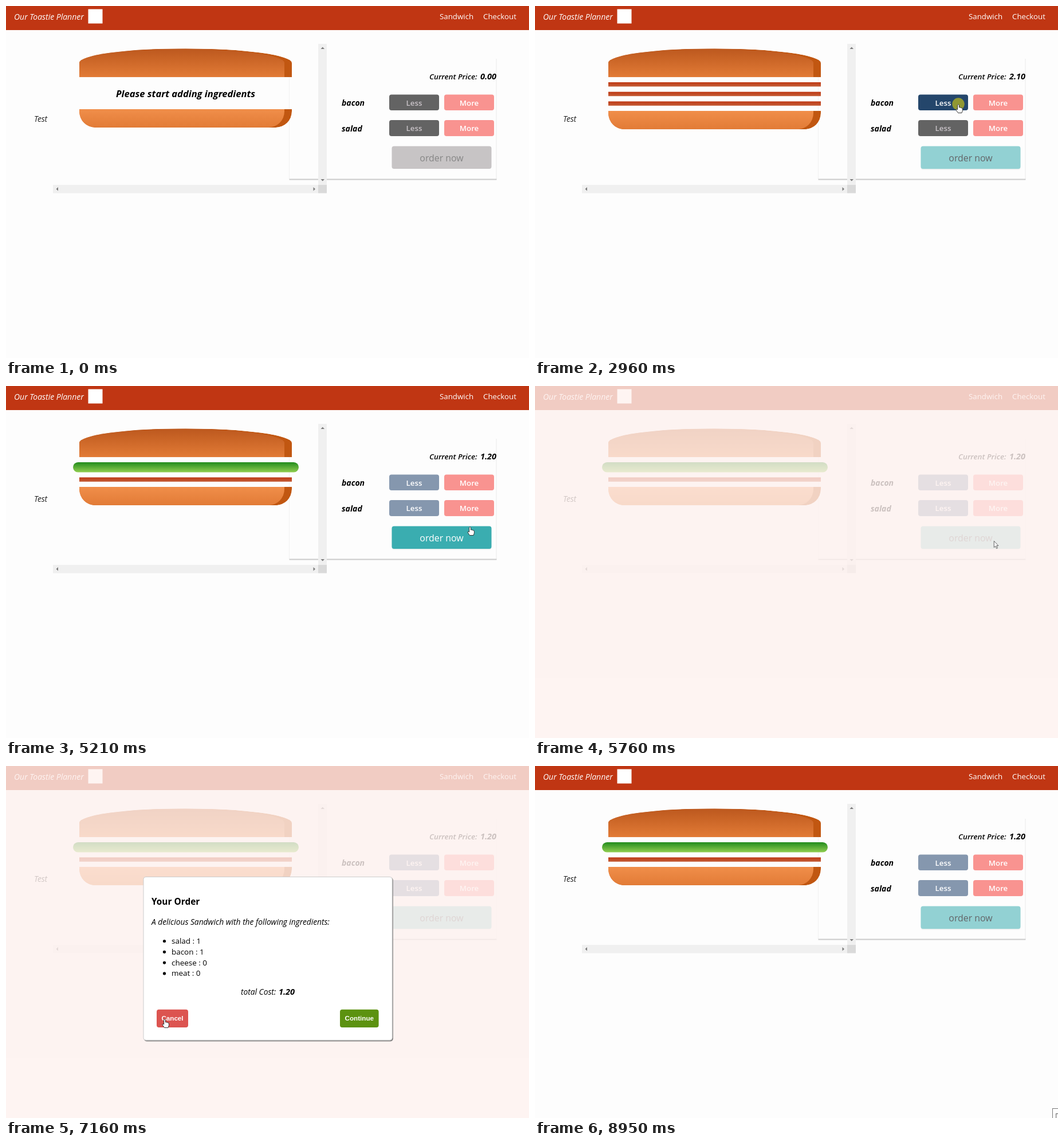
An HTML page for the animation above (9050 ms loop, 913x614 px).

```html
<!DOCTYPE html>
<html lang="en">
<head>
<meta charset="utf-8">
<title>Our Toastie Planner</title>
<style>
html, body { margin: 0; width: 100%; height: 100%; overflow: hidden; background: #fdfdfd; }
svg { display: block; }
text { font-family: "Open Sans", "Noto Sans", sans-serif; font-size: 13.3px; white-space: pre; }
.i { font-style: italic; font-size: 13.8px; }
.b { font-weight: 700; }
.mid { text-anchor: middle; }
.end { text-anchor: end; }
.semi { font-weight: 600; }
.nav { font-size: 13.3px; }
.ui { font: 700 11.65px "Liberation Sans", Arial, sans-serif; }
</style>
</head>
<body>
<svg id="stage" width="913" height="614" viewBox="0 0 913 614">
  <defs>
    <path id="top" d="M0 50V25A185.5 25 0 0 1 371 25V50Z"/>
    <path id="bottom" d="M0 0H371V4A28 28 0 0 1 343 32H28A28 28 0 0 1 0 4Z"/>
    <clipPath id="topClip"><use href="#top"/></clipPath>
    <clipPath id="bottomClip"><use href="#bottom"/></clipPath>
    <linearGradient id="topFill" x2="0" y2="1"><stop stop-color="#bc581e"/><stop offset="1" stop-color="#e27b36"/></linearGradient>
    <linearGradient id="bottomFill" x2="0" y2="1"><stop stop-color="#f08e4a"/><stop offset="1" stop-color="#e27b36"/></linearGradient>
    <linearGradient id="baconFill" x2="0" y2="1"><stop stop-color="#bf3813"/><stop offset="1" stop-color="#c45e38"/></linearGradient>
    <linearGradient id="saladFill" x2="0" y2="1"><stop stop-color="#228c1d"/><stop offset="1" stop-color="#91ce50"/></linearGradient>
  </defs>
  <g id="view"></g>
</svg>
<script>
const LOOP = 9050;
const OPEN = 5760, CLOSE = 7480;

// start, end, steps, then a quadratic curve: from, control, to
const MOVES = [
  [220, 850, 9, 646, 780, 994, -104, 812, 172],
  [2030, 2490, 7, 812, 172, 780, 258, 741, 172],
  [2640, 2640, 1, 741, 172, 740, 171, 739, 171],
  [3600, 3970, 6, 739, 171, 745, 230, 815, 234],
  [4200, 4280, 2, 815, 234, 815, 227, 814, 219],
  [5120, 5360, 4, 814, 219, 812, 245, 801, 270],
  [OPEN, OPEN, 1, 801, 270, 801, 270, 801, 270],
  [6460, 7160, 10, 801, 270, 160, 445, 277, 441],
  [7790, 8080, 5, 277, 441, 620, 66, 925, 772]
];
const BACON = [[0, 0], [1390, 1], [1550, 2], [1710, 3], [3040, 2], [3130, 1]];
const SALAD = [[0, 0], [4660, 1]];
const PRESSES = [[1310, 1390], [1470, 1550], [1630, 1710], [2960, 3130]];
const MODAL_TICKS = [0, OPEN, 5840, 5910, 5990, 6070, CLOSE, 7560, 7630];

const BUTTONS = {
  baconLess: [669, 154.5, 87, 27.5], baconMore: [765, 154.5, 87, 27.5],
  saladLess: [669, 199, 87, 28], saladMore: [765, 199, 87, 28],
  order: [673.5, 244.5, 174, 39.5],
  cancel: [263, 424.8, 55, 31.2], proceed: [583, 424.8, 67.6, 31.2]
};

const last = (list, t) => list.filter(e => e[0] <= t).pop();
const easeOut = x => 1 - Math.pow(1 - Math.min(1, Math.max(0, x)), 1.7);
const text = (x, y, str, cls = "", fill = "#000", size = 0) =>
  `<text x="${x}" y="${y}" class="${cls}" fill="${fill}"${size ? ` style="font-size:${size}px"` : ""}>${str}</text>`;
const rect = (x, y, w, h, fill, r = 0, more = "") =>
  `<rect x="${x}" y="${y}" width="${w}" height="${h}" rx="${r}" fill="${fill}" ${more}/>`;
const shape = (d, fill) => `<path d="${d}" fill="${fill}"/>`;

function stateAt(t) {
  const bacon = last(BACON, t)[1], salad = last(SALAD, t)[1];
  return { bacon, salad, price: (bacon * 0.7 + salad * 0.5).toFixed(2), open: t >= OPEN && t < CLOSE };
}

function hit(x, y, s) {
  const live = s.open ? ["cancel", "proceed"] : ["baconMore", "saladMore"];
  if (!s.open) {
    if (s.bacon) live.push("baconLess");
    if (s.salad) live.push("saladLess");
    if (s.bacon + s.salad) live.push("order");
  }
  return live.find(k => {
    const [bx, by, w, h] = BUTTONS[k];
    return x >= bx && x <= bx + w && y >= by && y <= by + h;
  });
}

// The pointer keeps its place and its look until the next step.
const pointer = MOVES.flatMap(([t0, t1, n, ax, ay, cx, cy, bx, by]) =>
  Array.from({ length: n }, (_, i) => {
    const u = (i + 1) / n, v = 1 - u;
    const time = Math.floor((n > 1 ? t0 + (t1 - t0) * i / (n - 1) : t0) / 10) * 10;
    const x = Math.round(v * v * ax + 2 * u * v * cx + u * u * bx);
    const y = Math.round(v * v * ay + 2 * u * v * cy + u * u * by);
    return [time, x, y, hit(x, y, stateAt(time))];
  }));

function bun(kind, y) {
  return `<g transform="translate(128 ${y})"><g clip-path="url(#${kind}Clip)">
    <use href="#${kind}" fill="#c15711"/><use href="#${kind}" x="-13" fill="url(#${kind}Fill)"/></g></g>`;
}

function sandwich({ bacon, salad }) {
  let y = 133, out = bun("top", 74.2);
  if (!bacon && !salad) return out + text(313.5, 159, "Please start adding ingredients", "i b mid", "#000", 16.55) + bun("bottom", 180);
  for (let i = 0; i < salad; i++, y += 26.4) out += rect(117, y, 394, 17.5, "url(#saladFill)", 8.7);
  for (let i = 0; i < bacon; i++, y += 16.7) out += rect(128, y, 371, 7.5, "url(#baconFill)");
  return out + bun("bottom", y);
}

function control(key, on, hover) {
  const [x, y, w, h] = BUTTONS[key], less = key.endsWith("Less");
  const fill = less ? (!on ? "#636363" : hover ? "#24466b" : "#8597ae") : hover ? "#c03612" : "#f99390";
  return rect(x, y, w, h, fill, 4) +
    text(x + w / 2, y + 19.4, less ? "Less" : "More", "semi mid", on ? "#fff" : "#c9c3c8");
}

function orderButton(on, hover) {
  const [x, y, w, h] = BUTTONS.order;
  return (on ? rect(x, y + 1.5, w, h, "#e9eeee", 4) : "") +
    rect(x, y, w, h, !on ? "#c7c4c5" : hover ? "#3aadb0" : "#92d1d3", 4) +
    text(760.5, 271, "order now", "mid", !on ? "#868686" : hover ? "#fff" : "#636568", 15.9);
}

function page(s, hover) {
  const any = s.bacon + s.salad > 0;
  return rect(0, 0, 913, 42, "#c03613") +
    text(14, 24, "Our Toastie Planner", "i", "#fff", 14) + rect(143.5, 5.5, 25, 25, "#fff") +
    text(757, 23, "Sandwich", "nav", "#fff") + text(833, 23, "Checkout", "nav", "#fff") +
    text(49, 202, "Test", "i", "#222") +
    rect(494, 92, 1, 210, "#f1f1f1") + rect(855.5, 92, 1, 210, "#ececec") + rect(494.5, 301.5, 362, 2, "#cbcbcb") +
    rect(495, 92, 50, 120, "#fdfdfd") + sandwich(s) +
    rect(545, 66, 15, 246, "#f0f0f0") + rect(82, 312, 463, 14.5, "#f0f0f0") + rect(545, 312, 15, 14.5, "#dadada") +
    shape("M549.5 75L552.7 71.5L556 75ZM549.5 302L552.7 305.5L556 302ZM91 316L87.5 319.2L91 322.5ZM536.5 316L540 319.2L536.5 322.5Z", "#7c7c7c") +
    text(739, 128, "Current Price:", "i semi", "#000", 13.4) + text(856, 128, s.price, "i b end", "#000", 14.5) +
    text(586, 174, "bacon", "i b", "#000", 14) + text(586, 218.5, "salad", "i b", "#000", 14) +
    control("baconLess", s.bacon > 0, hover === "baconLess") + control("baconMore", true, hover === "baconMore") +
    control("saladLess", s.salad > 0, hover === "saladLess") + control("saladMore", true, hover === "saladMore") +
    orderButton(any, hover === "order");
}

function modal(t, s) {
  const tick = MODAL_TICKS.filter(m => m <= t).pop();
  const away = t < OPEN ? 1 : t < CLOSE ? 1 - easeOut((tick - 5750) / 300) : easeOut((tick - 7434) / 300);
  if (away > 0.79) return "";
  const items = ["salad : " + s.salad, "bacon : " + s.bacon, "cheese : 0", "meat : 0"];
  const act = (key, label, fill) => {
    const [x, y, w, h] = BUTTONS[key];
    return rect(x, y, w, h, fill, 4) + text(x + w / 2, 444, label, "ui mid", "#fff");
  };
  return `<g opacity="${(1 - away).toFixed(3)}" transform="translate(0 ${Math.round(-614 * away)})">` +
    rect(241, 195, 435, 285.7, "#c4bfbe", 5) + rect(241, 194.5, 434.6, 285.3, "#777", 4.5) +
    rect(240, 193.5, 434.2, 284.7, "#fff", 4, 'stroke="#ccc"') +
    text(254, 241.5, "Your Order", "b", "#000", 15.4) +
    text(254, 277, "A delicious Sandwich with the following ingredients:", "i") +
    items.map((item, i) => {
      const y = 310 + 18.8 * i;
      return `<circle cx="276.5" cy="${y - 4.5}" r="2.6"/>` + text(289, y, item, "", "#000", 13.45);
    }).join("") +
    text(410, 399, "total Cost:", "i") + text(504, 399, s.price, "i b end", "#000", 14.5) +
    act("cancel", "Cancel", "#dc5450") + act("proceed", "Continue", "#5c9210") + "</g>";
}

function cursor(p, pressed) {
  if (!p) return "";
  const [, x, y, over] = p;
  const d = over
    ? "M-1.4 1.8Q0-.6 1.4 1.8V6Q3 5.2 3.8 6.3Q5.2 5.8 5.8 7Q7.4 6.8 7.4 8.6V11.5L6 15.5H-.5L-3.8 10.6Q-4 8.4-2.5 8.8L-1.4 10Z"
    : "M.3 .4V11.6L2.9 9.3L4.7 13.5L6.5 12.7L4.7 8.6H8Z";
  return (pressed ? `<circle cx="${x}" cy="${y}" r="10.7" fill="rgba(244,228,0,.52)"/>` : "") +
    `<path transform="translate(${x} ${y})" d="${d}" fill="#fff" stroke="${over ? "#222" : "#555"}" stroke-width=".9" stroke-linejoin="round"/>`;
}

function hint(t) {
  if (t < 8860) return "";
  return `<g opacity="${t < 8950 ? 0.5 : 1}">` + rect(903.5, 597.5, 60, 30, "#fff", 0, 'stroke="#777"') +
    text(908, 615, "D", "", "#555", 12) + "</g>";
}

function scene(t) {
  const s = stateAt(t), p = last(pointer, t);
  const pressed = PRESSES.some(([a, b]) => t >= a && t < b);
  return page(s, p && p[3]) +
    (s.open ? rect(0, 0, 913, 614, "rgba(254,242,239,.8)") : "") +
    modal(t, s) + cursor(p, pressed) + hint(t);
}

const view = document.getElementById("view");
let shown = "";
function draw() {
  const next = scene(performance.now() % LOOP);
  if (next !== shown) view.innerHTML = shown = next;
  requestAnimationFrame(draw);
}
draw();
</script>
</body>
</html>
```
